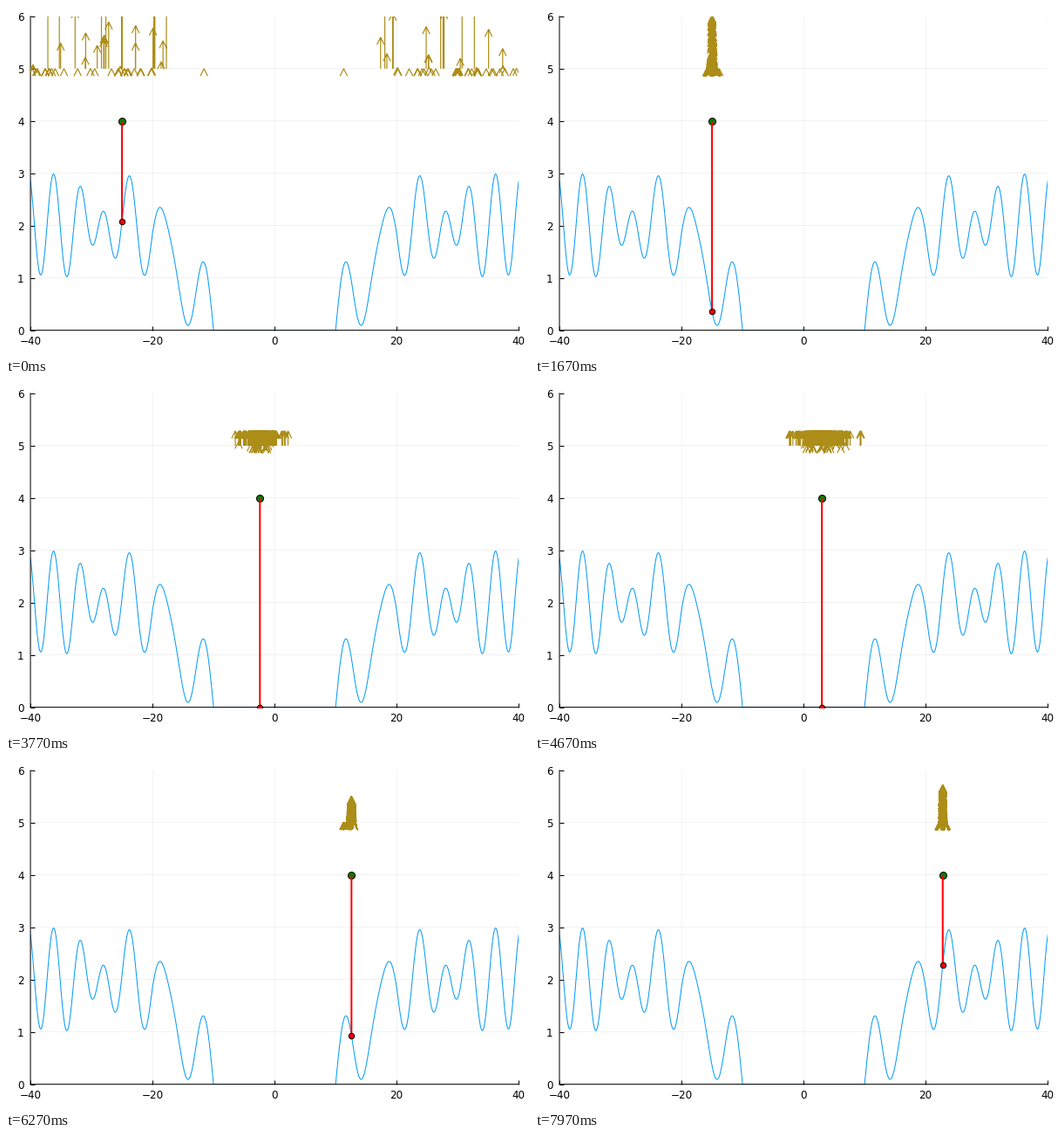
Recreate the animation shown at these times as a matplotlib script. Size 600 by 400 pixels, loop 8000 ms.

```python
import math
import numpy as np
import matplotlib.pyplot as plt
from matplotlib.animation import FuncAnimation

W, H, DPI = 600, 400, 100
PX = 72 / DPI                     # one pixel in points
LEFT, RIGHT, TOP, BOTTOM = 28.04, 588.19, 11.81, 371.61
STEPS, FRAMES, LOOP_MS = 240, 300, 8000
START, SPEED, ALT = -25.0, 0.2, 4
N, SCALE, BASE = 200, 50, 5       # particles, arrow scale, arrow base line
MEAS_SD, MOVE_SD = 0.1, 0.24
GOLD, BLUE = "#ac8d18", "#009af9"

plt.rcParams["font.family"] = "DejaVu Sans"
plt.rcParams["path.simplify"] = False
plt.rcParams["path.snap"] = False


def ground(x):
    u = np.abs(x) - 10
    k = u / 30
    hills = (1 - k) * np.sin(u) + k * np.sin(1.5 * u) + np.minimum(0.2 * u, 2)
    return np.where(u > 0, hills, 0.0)


def plane_at(step):
    return START + SPEED * step


def resample(x, w, rng):
    marks = (np.arange(N) + rng.random()) / N
    picks = np.searchsorted(np.cumsum(w), marks)
    return x[np.minimum(picks, N - 1)]


def run_filter():
    """Particle filter: weigh by terrain height, resample when few count, move."""
    rng = np.random.default_rng(7)
    x, w = rng.uniform(-40, 40, N), np.full(N, 1 / N)
    history = []
    for step in range(STEPS):
        plane = plane_at(step)
        x[0] = plane              # one particle always stays on the true path
        miss = ground(x) - ground(plane)
        w = w * np.exp(-0.5 * (miss / MEAS_SD) ** 2)
        w /= w.sum()
        history.append((x.copy(), w.copy()))
        if 1 / np.sum(w ** 2) < N / 2:
            x, w = resample(x, w, rng), np.full(N, 1 / N)
        x = x + SPEED + rng.normal(0, MOVE_SD, N)
    return history


def arrow_path(x, w):
    """Shaft and open head of every arrow as one broken line."""
    tip = BASE + SCALE * w
    x, tip = x[tip > BASE], tip[tip > BASE]
    dx, dy = 4.2 / 7, 8.5 / 60
    gap = np.full_like(x, np.nan)
    base = np.full_like(x, BASE)
    xs = np.column_stack([x, x, gap, x - dx, x, x + dx, gap])
    ys = np.column_stack([base, tip, gap, tip - dy, tip, tip - dy, gap])
    return xs.ravel(), ys.ravel()


fig = plt.figure(figsize=(W / DPI, H / DPI), dpi=DPI, facecolor="white")
ax = fig.add_axes([LEFT / W, 1 - BOTTOM / H, (RIGHT - LEFT) / W, (BOTTOM - TOP) / H])
ax.set(xlim=(-40, 40), ylim=(0, 6),
       xticks=range(-40, 41, 20), yticks=range(7))
ax.set_axisbelow(True)
ax.grid(color="black", alpha=0.1, lw=0.5 * PX)
ax.tick_params(direction="in", length=4.7 * PX, width=PX, labelsize=12 * PX)
ax.tick_params(axis="x", pad=6 * PX)
ax.tick_params(axis="y", pad=7.5 * PX)
for side in ("top", "right"):
    ax.spines[side].set_visible(False)
for side in ("left", "bottom"):
    ax.spines[side].set(linewidth=PX, zorder=2.5)

xs = np.linspace(-40, 40, 1601)
ax.plot(xs, ground(xs), color=BLUE, lw=PX, zorder=2)
arrows, = ax.plot([], [], color=GOLD, lw=1.2 * PX, zorder=3,
                  solid_joinstyle="miter", solid_capstyle="butt")


def dot(color, size, z):
    return ax.scatter([START], [ALT], s=(size * PX) ** 2, c=color,
                      edgecolors="black", linewidths=PX, zorder=z)


plane_dot = dot("green", 8, 4)
beam, = ax.plot([], [], color="red", lw=2 * PX, zorder=5,
                solid_capstyle="butt")
ground_dot = dot("red", 6.4, 6)

history = run_filter()


def draw(frame):
    step = min(math.ceil(frame * STEPS / FRAMES), STEPS - 1)
    plane = plane_at(step)
    floor = float(ground(plane))
    arrows.set_data(*arrow_path(*history[step]))
    plane_dot.set_offsets([[plane, ALT]])
    beam.set_data([plane, plane], [ALT, floor])
    ground_dot.set_offsets([[plane, floor]])
    return arrows, plane_dot, beam, ground_dot


anim = FuncAnimation(fig, draw, frames=FRAMES, interval=LOOP_MS / FRAMES,
                     repeat=True, repeat_delay=0)
plt.show()
```
